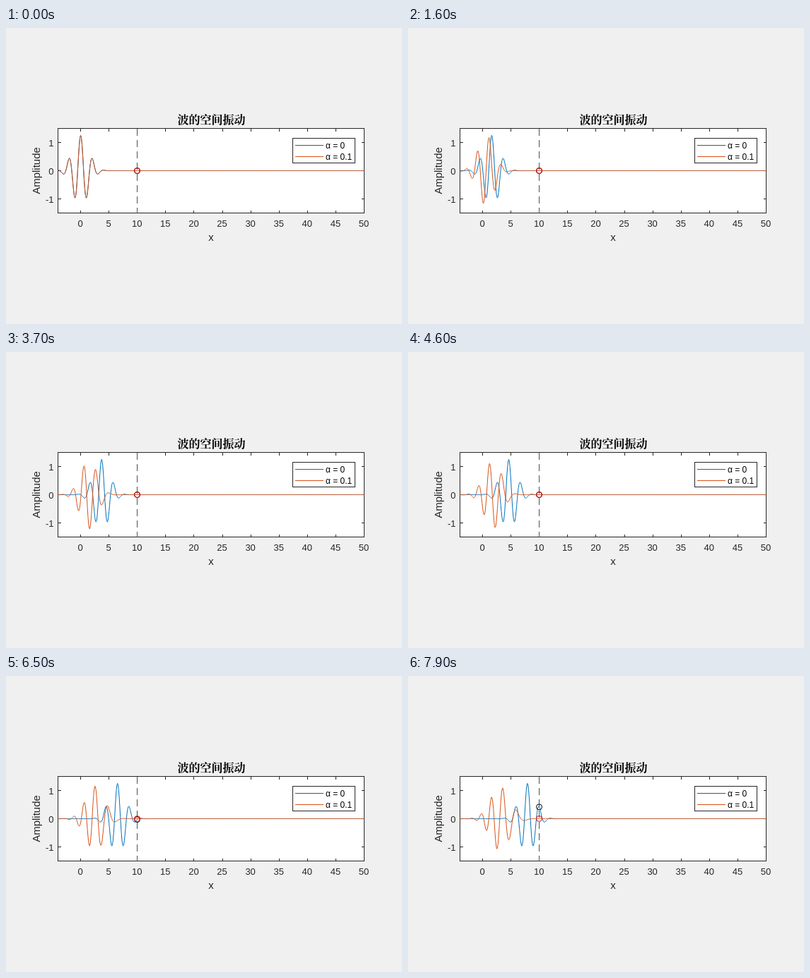
Animation, 560 px wide and 420 px high, one loop 8 s. Source, as an HTML page:

```html
<!DOCTYPE html>
<html lang="zh-CN">
<head>
<meta charset="utf-8">
<title>波的空间振动</title>
<style>
  html, body { margin: 0; width: 100%; height: 100%; overflow: hidden; background: #f0f0f0; }
  svg { display: block; width: 560px; height: 420px; }
  text { font-family: "Liberation Sans", Arial, sans-serif; fill: #262626; }
  .tick { font-size: 13px; }
  .label { font-size: 15px; text-anchor: middle; }
  .legend { font-size: 12px; fill: #000; }
  .title {
    font: bold 16px "Noto Serif CJK SC", "Noto Sans CJK SC", "Noto Sans CJK", serif;
    text-anchor: middle; fill: #000;
  }
  .axis { fill: none; stroke: #262626; shape-rendering: crispEdges; }
  .curve, .marker { fill: none; stroke-width: 1; stroke-linejoin: round; }
</style>
</head>
<body>
<svg id="plot" viewBox="0 0 560 420"></svg>
<script>
const LEFT = 73.5, RIGHT = 506.5, TOP = 142.5, BOTTOM = 262.5;
const X_MIN = -4, X_MAX = 50, Y_MAX = 1.5;
const BLUE = '#0072bd', ORANGE = '#d95319', GRAY = '#505050';
const LOOP = 8000, STEP = 100;
const K0 = 3, ALPHA = 0.1, PEAK = Math.sqrt(Math.PI / 2), PROBE = 10;

const svg = document.getElementById('plot');
const px = x => LEFT + (x - X_MIN) * (RIGHT - LEFT) / (X_MAX - X_MIN);
const py = y => (TOP + BOTTOM) / 2 - y * (BOTTOM - TOP) / (2 * Y_MAX);
const snap = v => Math.floor(v) + 0.5;

function add(tag, attrs, content = '') {
  const el = document.createElementNS('http://www.w3.org/2000/svg', tag);
  for (const name in attrs) el.setAttribute(name, attrs[name]);
  el.textContent = content;
  return svg.appendChild(el);
}
const label = (x, y, content, cls, extra) =>
  add('text', { x, y, class: cls, ...extra }, content);

// Axes, ticks and tick labels
add('rect', { x: LEFT, y: TOP, width: RIGHT - LEFT, height: BOTTOM - TOP, fill: '#fff' });
let ticks = `M${LEFT} ${TOP}H${RIGHT}V${BOTTOM}H${LEFT}Z`;
for (let x = 0; x <= X_MAX; x += 5) {
  const at = snap(px(x));
  ticks += `M${at} ${BOTTOM}v-4M${at} ${TOP}v4`;
  label(px(x) - 0.5, 282, x, 'tick', { 'text-anchor': 'middle' });
}
for (let y = -1; y <= 1; y++) {
  ticks += `M${LEFT} ${py(y)}h4M${RIGHT} ${py(y)}h-4`;
  label(67.5, py(y) + 5, y, 'tick', { 'text-anchor': 'end' });
}
add('path', { d: ticks, class: 'axis' });
label(290.5, 135.5, '波的空间振动', 'title');
label(290, 302, 'x', 'label');
label(0, 0, 'Amplitude', 'label', { transform: 'translate(48 202.5) rotate(-90)' });

// Moving parts
const curve = stroke => add('path', { class: 'curve', stroke });
const marker = stroke =>
  add('circle', { class: 'marker', stroke, r: 4, cx: snap(px(PROBE)) });

const freeCurve = curve(BLUE);
const slowCurve = curve(ORANGE);
add('path', {
  d: `M${snap(px(PROBE))} ${TOP}V${BOTTOM}`, stroke: GRAY,
  'stroke-dasharray': '10 6', 'shape-rendering': 'crispEdges'
});
const freeMarker = marker('#000');
const slowMarker = marker('#f00');

// Legend
add('rect', { x: 405.5, y: 156.5, width: 88, height: 35, class: 'axis', style: 'fill:#fff' });
[['α = 0', GRAY, 166.5], ['α = 0.1', ORANGE, 182.5]].forEach(([name, stroke, y]) => {
  add('path', { d: `M409 ${y}H449`, stroke });
  label(452, y + 4.5, name, 'legend');
});

// Gaussian spectrum around K0, with dispersion w = k / sqrt(1 + ALPHA k^2)
const modes = [];
for (let i = 0; i <= 60; i++) {
  const k = i / 10;
  modes.push({ k, w: k / Math.sqrt(1 + ALPHA * k * k), a: Math.exp(-((k - K0) ** 2)) });
}
const total = modes.reduce((sum, m) => sum + m.a, 0);

function freeWave(x, t) {
  const u = x - t;
  return PEAK * Math.exp(-u * u / 4) * Math.cos(K0 * u);
}
function slowWave(x, t) {
  let sum = 0;
  for (const { k, w, a } of modes) sum += a * Math.cos(k * x - w * t);
  return PEAK * sum / total;
}

function trace(wave, t) {
  const points = [];
  for (let i = 0; i <= 540; i++) {
    const x = X_MIN + i / 10;
    points.push(px(x).toFixed(2) + ' ' + py(wave(x, t)).toFixed(2));
  }
  return 'M' + points.join('L');
}

function draw(t) {
  freeCurve.setAttribute('d', trace(freeWave, t));
  slowCurve.setAttribute('d', trace(slowWave, t));
  freeMarker.setAttribute('cy', py(freeWave(PROBE, t)));
  slowMarker.setAttribute('cy', py(slowWave(PROBE, t)));
}

let shown = -1;
function tick() {
  const step = Math.floor(performance.now() % LOOP / STEP);
  if (step !== shown) draw(step * STEP / 1000);
  shown = step;
  requestAnimationFrame(tick);
}
tick();
</script>
</body>
</html>
```
